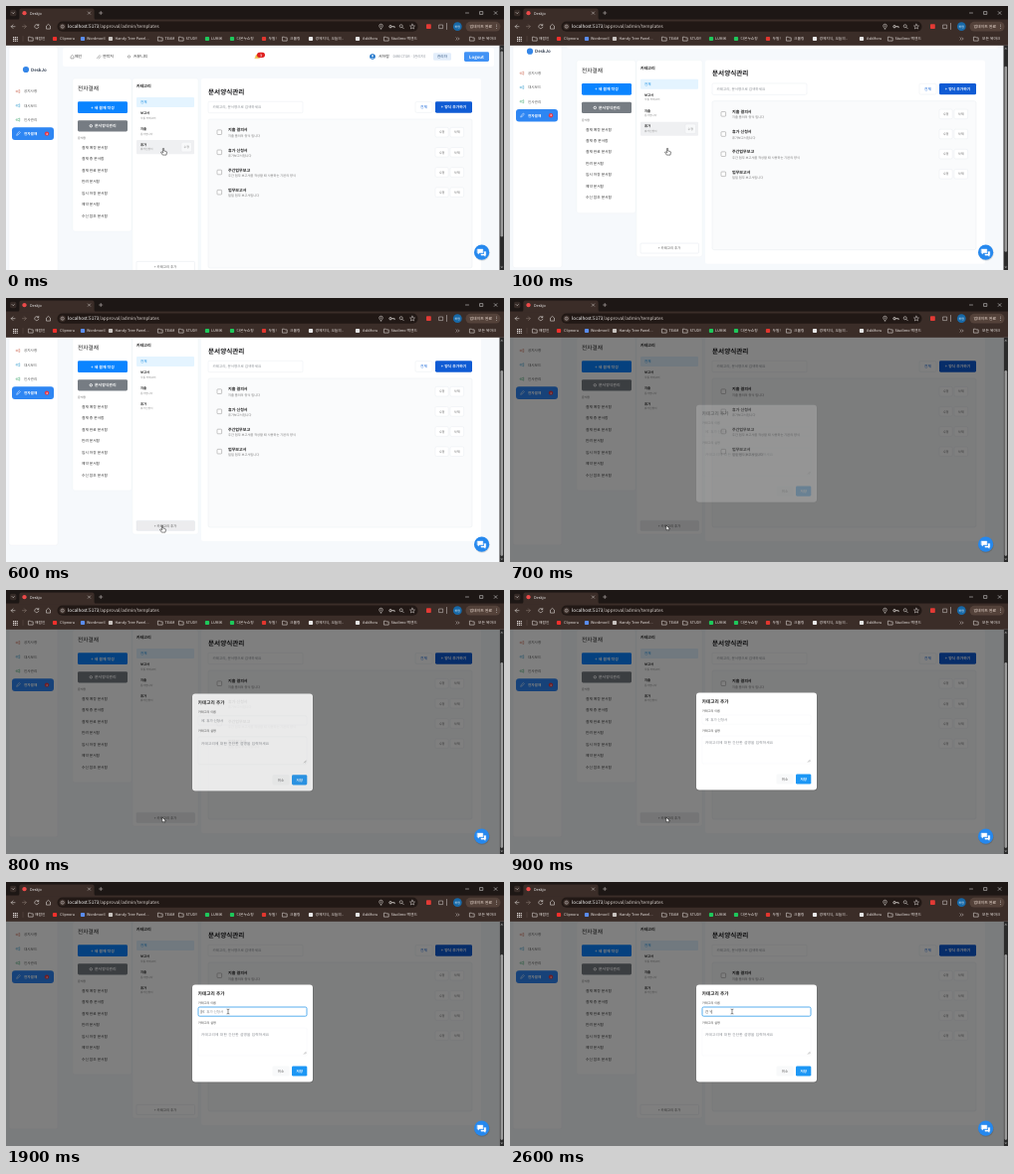
Recreate the animation shown at these times as an HTML page. Size 500 px wide and 266 px high, loop 3000 ms.

```html
<!DOCTYPE html>
<html lang="ko">
<head>
<meta charset="utf-8">
<title>Approval templates</title>
<style>
html, body { margin: 0; width: 100%; height: 100%; overflow: hidden; background: #f6f9fc; }
svg { display: block; width: 100%; height: 100%; }
text { font-family: "Noto Sans CJK KR", "Noto Sans CJK", "Noto Sans", sans-serif; text-rendering: geometricPrecision; white-space: pre; }
</style>
</head>
<body>
<svg id="stage" viewBox="0 0 500 266" preserveAspectRatio="none"></svg>
<script>
const LOOP = 3000, STEP = 100, SCROLL = 33;
const stage = document.getElementById('stage');

// Drawing helpers return markup; text y is the vertical centre of the line.
const text = (x, y, s, size = 3.6, fill = '#444', weight = 400, anchor = 'start') =>
  `<text x="${x}" y="${y + size * 0.36}" font-size="${size}" fill="${fill}" font-weight="${weight}" text-anchor="${anchor}">${s}</text>`;
const mid = (x, y, s, size, fill, weight) => text(x, y, s, size, fill, weight, 'middle');
const rect = (x, y, w, h, fill, r = 0, stroke = 'none', sw = 0.4) =>
  `<rect x="${x}" y="${y}" width="${w}" height="${h}" rx="${r}" fill="${fill}" stroke="${stroke}" stroke-width="${sw}"/>`;
const dot = (x, y, r, fill, stroke = 'none', sw = 0.6) =>
  `<circle cx="${x}" cy="${y}" r="${r}" fill="${fill}" stroke="${stroke}" stroke-width="${sw}"/>`;
const line = (d, stroke, sw = 0.6, fill = 'none') =>
  `<path d="${d}" fill="${fill}" stroke="${stroke}" stroke-width="${sw}" stroke-linejoin="round" stroke-linecap="round"/>`;
const button = (x, y, w, h, label, fill, ink, size = 3.4, weight = 400, stroke = 'none') =>
  rect(x, y, w, h, fill, 1.4, stroke) + mid(x + w / 2, y + h / 2, label, size, ink, weight);
const group = (id, body, attrs = '') => `<g id="${id}" ${attrs}>${body}</g>`;

const BLUE = '#0a84ff', LINE = '#e4e8ec', LIGHT = '#d9d3d0';

function header() {
  return rect(57, 42, 433, 19, '#fff', 2) +
    line('M65 52.5v-1.7l1.5-1.4 1.5 1.4v1.7z', '#666', 0.5) + text(69, 51, '메인', 3.9, '#333') +
    line('M91.5 52.5l2.5-3 M93 53l2-2.4', '#666', 0.5) + text(97, 51, '연락처', 3.9, '#333') +
    dot(123.5, 51, 1.2, 'none', '#666', 0.5) + text(128, 51, '커뮤니티', 3.9, '#333') +
    line('M250 52.5q.8-.8.8-2.2q.1-1.4 1.4-1.4t1.4 1.4q0 1.4.8 2.2z', '#e0a528', 0.4, '#f2bd40') +
    rect(252, 46.7, 8, 5.2, '#e02020', 2.6) + mid(256, 49.3, '3', 3.4, '#fff', 700) +
    dot(368, 51, 2.8, '#1971c9') + dot(368, 50.2, 0.9, '#fff') + line('M366.5 52.8q1.5-1.8 3 0', '#fff', 0.6) +
    text(374, 51, '서하람', 3.9, '#333', 500) + text(388.5, 51, 'DIRECTOR · (관리자)', 3.6, '#8a9099') +
    button(429, 47.2, 18, 7.6, '관리자', '#e3eefb', '#2a4f7c', 3.6, 500) +
    button(460, 46.2, 25, 9.8, 'Logout', '#4192f5', '#fff', 4.3, 700);
}

function sidebar() {
  const items = [['공지사항', '#d98a7a'], ['대시보드', '#62b2d8'], ['인사관리', '#67b98b']];
  return rect(3, 41, 49, 241, '#fff', 2, '#edf0f3') +
    dot(20, 64, 3.1, '#3486e8') + text(25, 64, 'DeskJo', 4.4, '#3a4658', 700) +
    items.map(([s, c], i) => {
      const y = 86 + i * 14.3;
      return line(`M10.5 ${y - 0.6}h1.4l1.8-1v3.2l-1.8-1h-1.4z`, c, 0.6) + text(18, y, s, 3.6, '#555');
    }).join('') +
    rect(6, 122.3, 42, 12.6, '#2e86f3', 3) + line('M10.8 130l.4-1.4 2.2-2.1 1 1-2.2 2.1z', '#fff', 0.5) +
    text(18, 128.6, '전자결재', 3.6, '#fff', 700) + dot(41, 128.6, 2.2, '#e63946') + mid(41, 128.6, '4', 2.7, '#fff', 700);
}

function menu() {
  const boxes = ['결재 예정', '결재 중', '결재 완료', '반려', '임시 저장', '예약', '수신 참조'];
  return rect(67, 73, 59, 154, '#fff', 2, '#eef1f4') +
    text(72, 83, '전자결재', 5.7, '#222', 500) +
    button(72, 96.3, 50, 11.8, '+ 새 결재 작성', BLUE, '#fff', 3.9, 700) +
    rect(72, 115.2, 50, 11.2, '#767c83', 1.4) + dot(85.3, 120.8, 1.2, 'none', '#fff', 0.9) +
    text(89, 120.8, '문서양식관리', 3.9, '#fff', 700) +
    text(72, 133, '문서함', 2.9, '#666') +
    boxes.map((s, i) => text(76, 142.6 + i * 11.45, s + ' 문서함', 3.7, '#333')).join('');
}

function categories() {
  const rows = [['보고서', '각종 카테고리', 107.8], ['지출', '문서입니다', 124], ['휴가', '휴가신청서', 139.6]];
  return rect(127, 73, 66, 198, '#fff', 2, '#eef1f4') +
    text(131, 80.6, '카테고리', 4, '#222', 700) +
    rect(131, 92, 58, 10, '#e4f4ff', 1) + text(135, 97, '전체', 3.5, '#168be0', 500) +
    group('rowHover', rect(131, 135, 58, 14.2, '#eff0f2', 1) +
      button(176, 137.3, 10.5, 9.6, '수정', '#f8f9fa', '#777', 2.9, 400, '#e2e4e7')) +
    rows.map(([a, b, y]) => text(135, y, a, 3.3, '#222', 600) + text(135, y + 4.8, b, 2.7, '#888')).join('') +
    `<rect id="addBtn" x="131" y="257.4" width="58.5" height="10" rx="1" stroke="#dfe3e7" stroke-width=".4"/>` +
    mid(160, 262.3, '+ 카테고리 추가', 3.4, '#555');
}

function templates() {
  const rows = [
    ['지출 결의서', '지출 품의의 양식 입니다'], ['휴가 신청서', '휴가보고서입니다'],
    ['주간업무보고', '주간 업무 보고서를 작성할 때 사용하는 기본의 양식'], ['업무보고서', '일일 업무 보고서입니다']];
  return rect(196, 73, 281, 205, '#fff', 2) +
    text(203, 86.2, '문서양식관리', 6.6, '#1d1d1f', 700) +
    rect(203, 96.3, 95, 11.4, '#fff', 1.4, LINE) + text(207.5, 102, '카테고리, 문서명으로 검색하세요', 3.55, '#8a8f95') +
    button(411, 96.6, 17, 10.8, '전체', '#fff', '#1565d8', 3.7, 500, LINE) +
    button(431, 96.3, 37, 11.4, '+ 양식 추가하기', '#0f5bd4', '#fff', 3.8, 700) +
    rect(203, 114, 265, 150, '#fafbfc', 2, LINE) +
    rows.map(([a, b], i) => {
      const y = 127.2 + i * 20.15;
      return rect(212, y - 2.3, 4.6, 4.6, '#fff', 0.7, '#8c8c8c', 0.5) +
        text(223, y - 2.2, a, 4, '#222', 600) + text(223, y + 3.4, b, 3.2, '#777') +
        button(431, y - 4.8, 13.2, 9.6, '수정', '#fff', '#666', 3.2, 400, LINE) +
        button(446, y - 4.8, 13.6, 9.6, '삭제', '#fff', '#666', 3.2, 400, LINE);
    }).join('');
}

function modal() {
  return rect(186.6, 104.3, 122, 98, '#0000002e', 3) +
    rect(187, 103.6, 121, 98, '#fff', 3) +
    text(192.8, 112.6, '카테고리 추가', 4.6, '#222', 700) +
    text(193, 122, '카테고리 이름', 3.1, '#444') +
    `<rect id="field" x="193" y="126" width="109" height="9.2" rx="1.4" fill="#fff"/>` +
    `<text id="typed" x="196" y="131.9" font-size="3.5"></text>` +
    `<path id="caret" stroke="#222" stroke-width=".4"/>` +
    text(193, 141.5, '카테고리 설명', 3.1, '#444') +
    rect(193, 147, 109, 28, '#fff', 1.4, '#f3f4f6') +
    `<g letter-spacing=".22">${text(196, 154, '카테고리에 대한 간단한 설명을 입력하세요', 3.6, '#85898f')}</g>` +
    line('M299.2 173.2l2-2 M300.4 173.2l.8-.8', '#777', 0.4) +
    button(267.5, 185.4, 17, 10.2, '취소', '#f8f9fa', '#555', 3.5) +
    button(287, 185.4, 15.3, 10.2, '저장', '#1c97f5', '#fff', 3.5, 600);
}

const folder = x => line(`M${x - 2.2} 31.2h1.6l.7.7h2.1v3.2h-4.4z`, LIGHT, 0.6);

function browser() {
  const bar = '#3b2d28';
  // Bookmarks: icon x, label x, label, icon colour (folder when empty).
  const marks = [
    [25, 29, '해람인'], [49, 54, 'Clipnoru', '#f0302c'], [77, 81, 'Wordmoril', '#5a8df0'],
    [105, 109.5, 'Handy Tree Panel...', '#c9c4c0'], [155, 159.5, 'TEAM'], [176, 180.5, 'STUDY'],
    [202, 206, 'LUMIK', '#1ec85b'], [227, 231.5, '다온누쇼핑', '#1ec85b'], [259, 263.5, '두밀!', '#e2362e'],
    [280, 285, '크롤링'], [306, 310.5, '경제지식, 오늘의..', '#e9e9e9'], [353, 358, 'AskMoru', '#e4e4e4'],
    [382, 386.5, 'Studimo 백엔드'], [468, 474, '모든 북마크']];
  return rect(0, 0, 500, 14.5, '#1d1715') + rect(0, 13.5, 500, 26.3, bar) +
    line('M11 14.5q2.4 0 2.4-2.4V4.5q0-2 2-2h71.2q2 0 2 2v7.6q0 2.4 2.4 2.4z', 'none', 0, bar) +
    rect(4, 3.8, 6.4, 6.4, '#352a26', 1.6) + line('M6 6.5l1.2 1.2 1.2-1.2', LIGHT) +
    dot(18.5, 7.2, 2.1, '#ec4a4a') + text(24, 7.2, 'Deskjo', 3.8, '#eee') +
    line('M82.3 5.9l2.4 2.4m0-2.4l-2.4 2.4 M93.6 7h3.2m-1.6-1.6v3.2', LIGHT, 0.5) +
    line('M461.5 7h3 M476 5.6h2.8v2.8h-2.8z M490.2 5.6l2.8 2.8m0-2.8l-2.8 2.8', '#eee', 0.5) +
    line('M9 20.7H5.3m1.7-1.8l-1.8 1.8 1.8 1.8', LIGHT) + line('M16.5 20.7h3.7m-1.7-1.8l1.8 1.8-1.8 1.8', '#85776f') +
    line('M32.6 19.4a2.1 2.1 0 1 0 .3 1.8 M32.8 18.3v1.4h-1.5', LIGHT) +
    line('M40.5 22.7v-2.6l2-1.7 2 1.7v2.6z', LIGHT) +
    rect(51.5, 15.5, 362, 10.3, '#211815', 5.1) +
    dot(56.7, 20.7, 3.2, '#3a2d28') + dot(56.7, 20.7, 1.6, 'none', LIGHT, 0.5) + line('M56.7 20.7v.7 M56.7 19.8v.05', LIGHT, 0.4) +
    text(62, 20.7, 'localhost:5173<tspan fill="#d6cfcb">/approval/admin/templates</tspan>', 4.65, '#fff') +
    line('M376.5 23q-1.8-2-1.8-3a1.8 1.8 0 0 1 3.6 0q0 1-1.8 3z', LIGHT) + dot(376.5, 20, 0.5, LIGHT) +
    dot(386, 20.7, 1.2, 'none', LIGHT, 0.8) + line('M387.3 20.7h2.8v1', LIGHT, 0.8) +
    dot(396.7, 20.2, 1.5, 'none', LIGHT) + line('M397.9 21.4l1.4 1.4', LIGHT) +
    line('M408 18.2l.7 1.7 1.8.1-1.4 1.2.5 1.8-1.6-1-1.6 1 .5-1.8-1.4-1.2 1.8-.1z', LIGHT, 0.5) +
    rect(422, 18.2, 4.8, 4.8, '#e33a35', 0.8) + line('M435 19h3.6v3.6h-3.6z M442.5 17.5v6', LIGHT, 0.5) +
    dot(453.3, 20.7, 4.4, '#1769a8') + mid(453.3, 20.7, '하람', 3, '#e8f2fa') +
    rect(461.5, 15.8, 35, 9.8, '#54423a', 4.9) + text(465.5, 20.7, '업데이트 완료', 3.9, '#f6e6dc', 500) +
    [19, 20.7, 22.4].map(y => dot(492.4, y, 0.4, '#eee')).join('') +
    [0, 1, 2].map(i => [0, 1, 2].map(j => rect(7 + i * 1.8, 31 + j * 1.8, 1.2, 1.2, LIGHT)).join('')).join('') +
    line('M17 30.5v5', '#6b5a52', 0.4) + line('M452 31.8l1.2 1.2-1.2 1.2 M454 31.8l1.2 1.2-1.2 1.2', LIGHT, 0.5) +
    marks.map(([x, lx, s, c]) => (c ? rect(x - 2.1, 30.9, 4.2, 4.2, c, 1) : folder(x)) + text(lx, 33, s, 3.75, '#e8e2df')).join('');
}

function chat() {
  return dot(478, 249, 7.7, '#00000022') + dot(477.6, 248.2, 7.6, '#2588ee') +
    line('M473.4 245h5.4v3.8h-3.4l-1.4 1.3v-1.3h-.6z', '#fff', 0.4, '#fff') +
    line('M480 247.4h1.8v3.8h-.6v1.2l-1.3-1.2h-3v-1.2h3.1z', '#fff', 0.3, '#fff');
}

const cursors = {
  hand: line('M-.5 0q.6-.7 1.1 0v2.5l2.2.5q.8.2.7 1l-.5 2.6H-.7L-2.4 4q.1-.9.9-.5l1 .7z', '#111', 0.5, '#fff'),
  arrow: line('M0 0v4.6l1.1-1 .8 1.7.7-.3-.8-1.7h1.5z', '#111', 0.4, '#fff'),
  beam: line('M-1-2.4q1 0 1 .5q0-.5 1-.5 M0-2v4 M-1 2.4q1 0 1-.5q0 .5 1 .5', '#222', 0.5)
};

stage.innerHTML =
  '<defs><filter id="soft" x="0" y="0" width="1" height="1"><feGaussianBlur stdDeviation=".32"/></filter></defs>' +
  rect(0, 0, 500, 266, '#f6f9fc') +
  group('view', group('page', header() + sidebar() + menu() + categories() + templates())) +
  group('shade', rect(0, 39, 495.5, 227, '#000'), 'opacity=".5"') +
  chat() + group('modal', modal()) +
  rect(495.5, 39.5, 4.5, 226.5, '#2b2b2b') +
  line('M496.8 43.3l1-1.3 1 1.3z M496.8 262.7l1 1.3 1-1.3z', '#9d9d9d', 0.2, '#9d9d9d') +
  group('thumb', rect(496.5, 45.5, 2.6, 187, '#9b9b9b', 1.3)) +
  browser() +
  Object.entries(cursors).map(([k, d]) => group(k, d)).join('');

const $ = id => document.getElementById(id);
const set = (id, attrs) => { for (const k in attrs) $(id).setAttribute(k, attrs[k]); };
const show = (id, on) => set(id, { display: on ? 'inline' : 'none' });
const move = (id, x, y) => set(id, { transform: `matrix(1 0 0 1 ${x} ${y})` });
const part = (t, a, b) => Math.min(1, Math.max(0, (t - a) / (b - a)));
const easeOut = p => 1 - (1 - p) ** 2;
const smooth = p => p * p * (3 - 2 * p);

function render(ms) {
  const t = Math.floor(ms / STEP) * STEP;
  const scroll = SCROLL * easeOut(part(t, 50, 200));
  const open = t >= 700;
  move('page', 0, -scroll);
  move('thumb', 0, scroll * 0.83);
  set('view', { filter: open ? 'url(#soft)' : 'none' });

  const down = smooth(part(t, 200, 600)), up = smooth(part(t, 900, 1500));
  const x = 158 - down + 66 * up, y = 143.5 + 86 * down - 99 * up;
  show('rowHover', t < 300);
  set('addBtn', { fill: t >= 500 && t < 1100 ? '#ececee' : '#fff' });

  const rise = easeOut(part(t, 680, 880));
  show('shade', open);
  show('modal', open);
  set('modal', { opacity: rise });
  move('modal', 0, 5 * (1 - rise));

  const focus = t >= 1600;
  set('field', { stroke: focus ? '#2f9bea' : '#f3f4f6', 'stroke-width': focus ? 0.8 : 0.4 });
  const word = t < 2100 ? '' : t < 2200 ? 'ㄱ' : t < 2300 ? '기' : t < 2600 ? '긴' : '긴ㄱ';
  $('typed').textContent = word || '예: 휴가 신청서';
  set('typed', { fill: word ? '#222' : '#85898f' });
  const cx = 196 + word.length * 3.3;
  set('caret', { d: `M${cx} 128.8v4` });
  show('caret', focus && t !== 1800);

  const kind = !open ? 'hand' : x > 193 && y < 135.5 ? 'beam' : 'arrow';
  for (const k in cursors) show(k, k === kind);
  move(kind, x, y);
}

function tick() {
  render(performance.now() % LOOP);
  requestAnimationFrame(tick);
}
tick();
</script>
</body>
</html>
```
